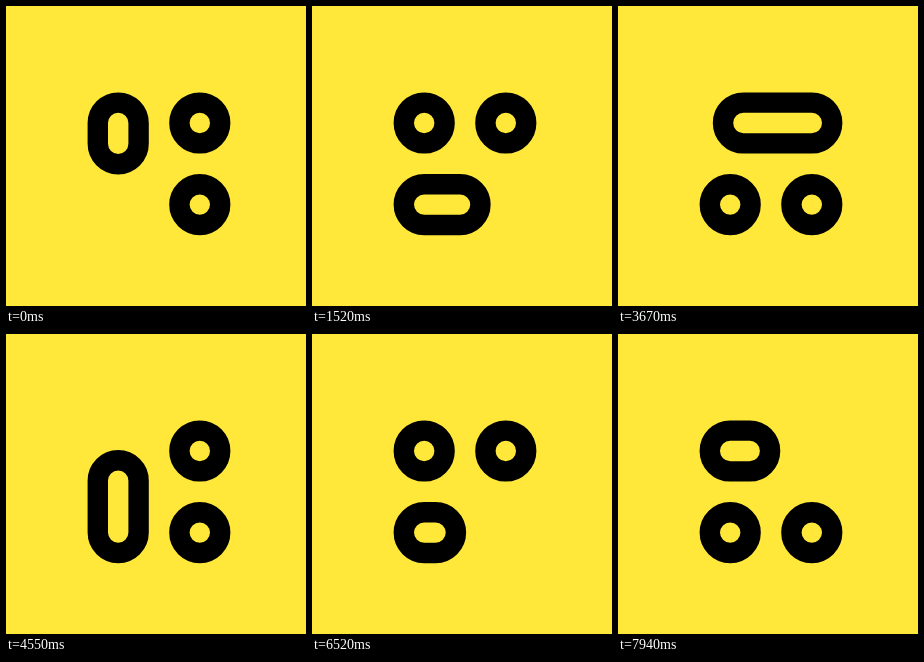
Animation of 300 by 300 pixels, one loop 8000 ms. Source, as an HTML page:

```html
<!DOCTYPE html>
<html lang="en">
<head>
<meta charset="utf-8">
<title>Three rings</title>
<style>
  html, body { margin: 0; width: 100%; height: 100%; overflow: hidden; background: #ffe83a; }
  svg { display: block; width: 100%; height: 100%; }

  /* One unit is the line weight: cells sit at 0 and 4, a ring is 2 wide, a stretched one 6. */
  rect { fill: none; stroke: #000; stroke-width: 1; rx: 1px; ry: 1px; animation: 8s linear infinite; }
  #a { animation-name: a; }
  #b { animation-name: b; }
  #c { animation-name: c; }

  @keyframes a {
    0%, 5.05%       { x: 0px; y: 0px; width: 2px; height: 3.02px; }
    6.8%, 37.21%    { x: 0px; y: 0px; width: 2px; height: 2px; }
    44.68%          { x: 0px; y: 0px; width: 6px; height: 2px; }
    52.14%, 82.55%  { x: 4px; y: 0px; width: 2px; height: 2px; }
    90.01%          { x: 4px; y: 0px; width: 2px; height: 6px; }
    97.48%, 100%    { x: 4px; y: 4px; width: 2px; height: 2px; }
  }
  @keyframes b {
    0%, 7.36%       { x: 4px; y: 4px; width: 2px; height: 2px; }
    14.83%          { x: 0px; y: 4px; width: 6px; height: 2px; }
    22.29%, 52.14%  { x: 0px; y: 4px; width: 2px; height: 2px; }
    59.6%           { x: 0px; y: 0px; width: 2px; height: 6px; }
    67.06%, 97.48%  { x: 0px; y: 0px; width: 2px; height: 2px; }
    100%            { x: 0px; y: 0px; width: 3.35px; height: 2px; }
  }
  @keyframes c {
    0%, 22.29%      { x: 4px; y: 0px; width: 2px; height: 2px; }
    29.75%          { x: 4px; y: 0px; width: 2px; height: 6px; }
    37.21%, 67.62%  { x: 4px; y: 4px; width: 2px; height: 2px; }
    75.09%          { x: 0px; y: 4px; width: 6px; height: 2px; }
    82.55%, 100%    { x: 0px; y: 4px; width: 2px; height: 2px; }
  }
</style>
</head>
<body>
<svg viewBox="0 0 300 300">
  <g transform="translate(91.8 96.6) scale(20.4)">
    <rect id="a"/>
    <rect id="b"/>
    <rect id="c"/>
  </g>
</svg>
</body>
</html>
```
